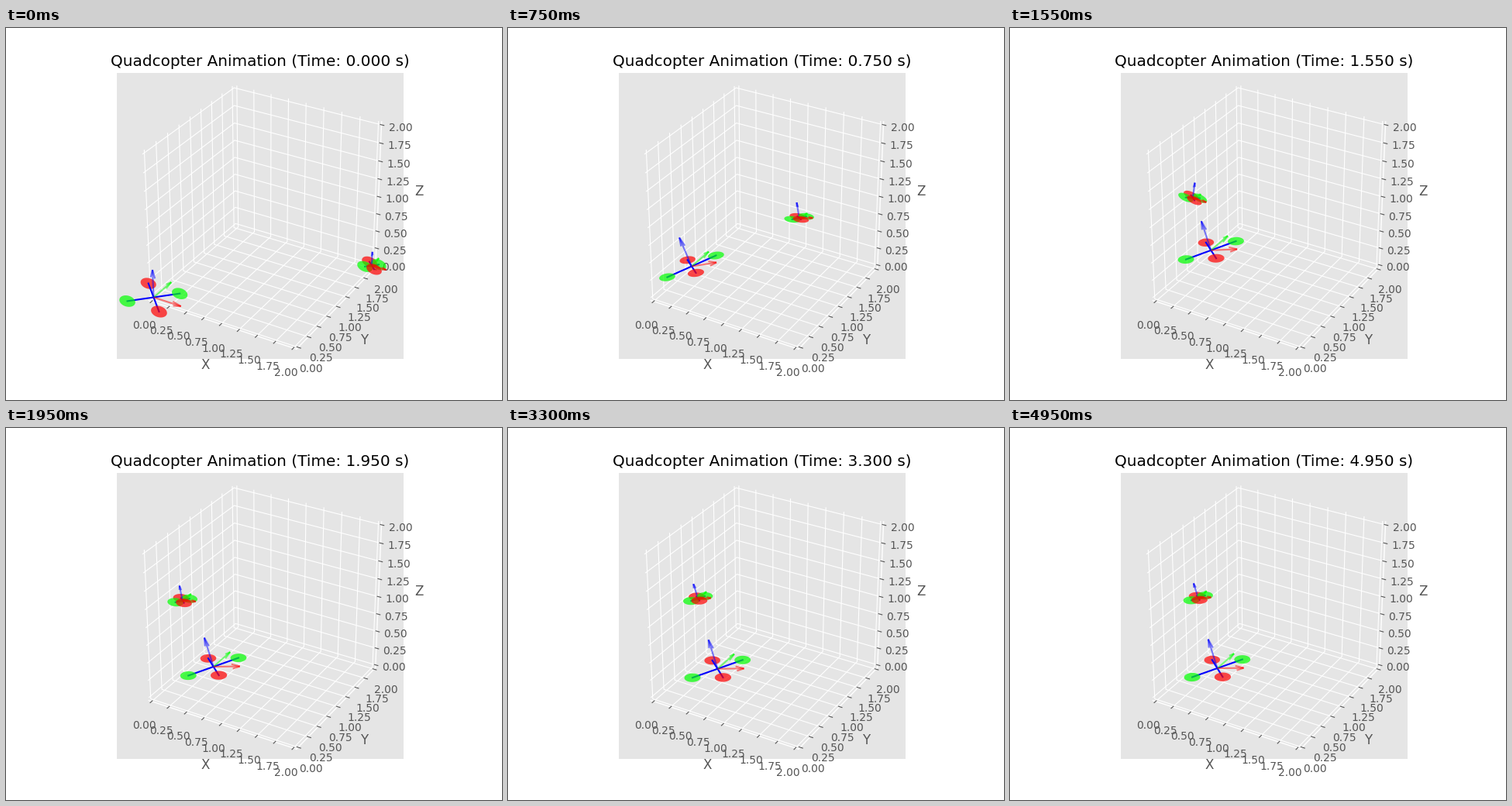
A matplotlib script that plays this animation: 640 by 480 pixels, repeating every 5 s.

```python
import numpy as np
import matplotlib.pyplot as plt
from matplotlib.animation import FuncAnimation
from mpl_toolkits.mplot3d.art3d import Poly3DCollection

plt.style.use("ggplot")

FRAMES, STEP_MS = 100, 50
ROTOR_RADIUS = 0.1
HOVER_PITCH = -18  # the rotors lie level at this body pitch
AXIS_COLORS = ("red", "lime", "blue")
ROTOR_COLORS = ("lime", "lime", "red", "red")
CORNERS = np.array([(1, 1, 0), (-1, -1, 0), (1, -1, 0), (-1, 1, 0)])

# Camera basis for elev=30, azim=-60, used to place the craft on the view plane.
RIGHT = np.array([np.sqrt(3) / 2, 0.5, 0])
UP = np.array([-0.25, np.sqrt(3) / 4, np.sqrt(3) / 2])
TOWARD = np.array([np.sqrt(3) / 4, -0.75, 0.5])
VIEW_X, VIEW_Y, VIEW_SCALE = 333.0, 237.4, 1997.8
DATA_SCALE = 0.52812


def bump(t, center, width):
    return np.exp(-((t - center) / width) ** 2)


def settle(t):
    return 1 - np.exp(-(t / 0.25) ** 2)


def low_attitude(t):
    """Pitch and roll in degrees: lean hard while climbing, then hover."""
    return settle(t) * (HOVER_PITCH - 7 * bump(t, 0.8, 0.55)), 0


def high_attitude(t):
    """Pitch and roll in degrees: level out and bank to brake, then hover."""
    pitch = HOVER_PITCH * settle(t) + 21 * bump(t, 1.45, 0.45)
    return pitch, -25 * bump(t, 1.2, 0.45)


def follow(path, t):
    """Smooth cubic interpolation through (time, x, y) points, at rest at the ends."""
    times, values = path[:, 0], path[:, 1:]
    slopes = np.gradient(values, times, axis=0)
    slopes[[0, -1]] = 0
    t = min(t, times[-1])
    i = min(np.searchsorted(times, t, side="right") - 1, len(times) - 2)
    h = times[i + 1] - times[i]
    s = (t - times[i]) / h
    return ((1 + 2 * s) * (1 - s) ** 2 * values[i]
            + s * (1 - s) ** 2 * h * slopes[i]
            + s * s * (3 - 2 * s) * values[i + 1]
            + s * s * (s - 1) * h * slopes[i + 1])


def to_world(x, y, depth):
    dist = 10 - depth
    across = (x - VIEW_X) / VIEW_SCALE * dist
    above = (VIEW_Y - y) / VIEW_SCALE * dist
    return 1 + (across * RIGHT + above * UP + depth * TOWARD) / DATA_SCALE


def rotation(pitch, roll=0):
    pitch, roll = np.radians([pitch, roll])
    cp, sp = np.cos(pitch), np.sin(pitch)
    cr, sr = np.cos(roll), np.sin(roll)
    return (np.array([[cp, 0, sp], [0, 1, 0], [-sp, 0, cp]])
            @ np.array([[1, 0, 0], [0, cr, -sr], [0, sr, cr]]))


class Quadcopter:
    def __init__(self, path, attitude, reach, axis_length, depth):
        self.path, self.attitude = np.array(path), attitude
        self.reach, self.axis_length, self.depth = reach, axis_length, depth

    def draw(self, ax, t):
        center = to_world(*follow(self.path, t), self.depth)
        rot = rotation(*self.attitude(t))
        artists = []

        hubs = center + self.reach * CORNERS @ rot.T
        for pair in (hubs[:2], hubs[2:]):
            artists += ax.plot(*pair.T, color="blue", lw=1.5)

        disc = ROTOR_RADIUS * CIRCLE @ (rot @ rotation(-HOVER_PITCH)).T
        for hub, color in zip(hubs, ROTOR_COLORS):
            rotor = Poly3DCollection([hub + disc], facecolors=color,
                                     edgecolors="none", alpha=0.7)
            artists.append(ax.add_collection3d(rotor))

        for direction, color in zip(rot.T, AXIS_COLORS):
            artists.append(ax.quiver(*center, *direction, color=color, alpha=0.5,
                                     length=self.axis_length, lw=1.5))
        return artists


angle = np.linspace(0, 2 * np.pi, 48, endpoint=False)
CIRCLE = np.column_stack([np.cos(angle), np.sin(angle), np.zeros_like(angle)])

fig = plt.figure(figsize=(6.4, 4.8), dpi=100)
ax = fig.add_subplot(projection="3d")
ax.set_box_aspect((1, 1, 1))
ax.view_init(elev=30, azim=-60)
margin = 2 / 48
limits = (-margin, 2 + margin)
ax.set(xlim=limits, ylim=limits, zlim=limits, xlabel="X", ylabel="Y", zlabel="Z")
for axis in (ax.xaxis, ax.yaxis, ax.zaxis):
    axis.set_ticks(np.arange(0, 2.01, 0.25))
    axis.set_pane_color((0.9, 0.9, 0.9, 0))

low = Quadcopter([(0, 190.5, 347.5), (0.55, 222, 328), (0.75, 237, 307.5),
                  (1.2, 250, 277.7), (1.95, 267.7, 308), (2.7, 272.3, 310.7),
                  (3.95, 267.5, 310)],
                 low_attitude, reach=0.233, axis_length=0.4, depth=-0.1)
high = Quadcopter([(0, 472, 306.5), (0.75, 375.7, 245), (1.2, 270, 222),
                   (1.95, 227.7, 222.5), (2.7, 243.3, 221.3), (3.95, 242.8, 219.2)],
                  high_attitude, reach=0.064, axis_length=0.2, depth=-0.2)
drawn = []


def update(frame):
    t = frame * STEP_MS / 1000
    while drawn:
        drawn.pop().remove()
    for quad in (low, high):
        drawn.extend(quad.draw(ax, t))
    ax.set_title(f"Quadcopter Animation (Time: {t:.3f} s)")
    return drawn


anim = FuncAnimation(fig, update, frames=FRAMES, interval=STEP_MS,
                     init_func=lambda: [], repeat=True, repeat_delay=0, blit=False)
plt.show()
```
